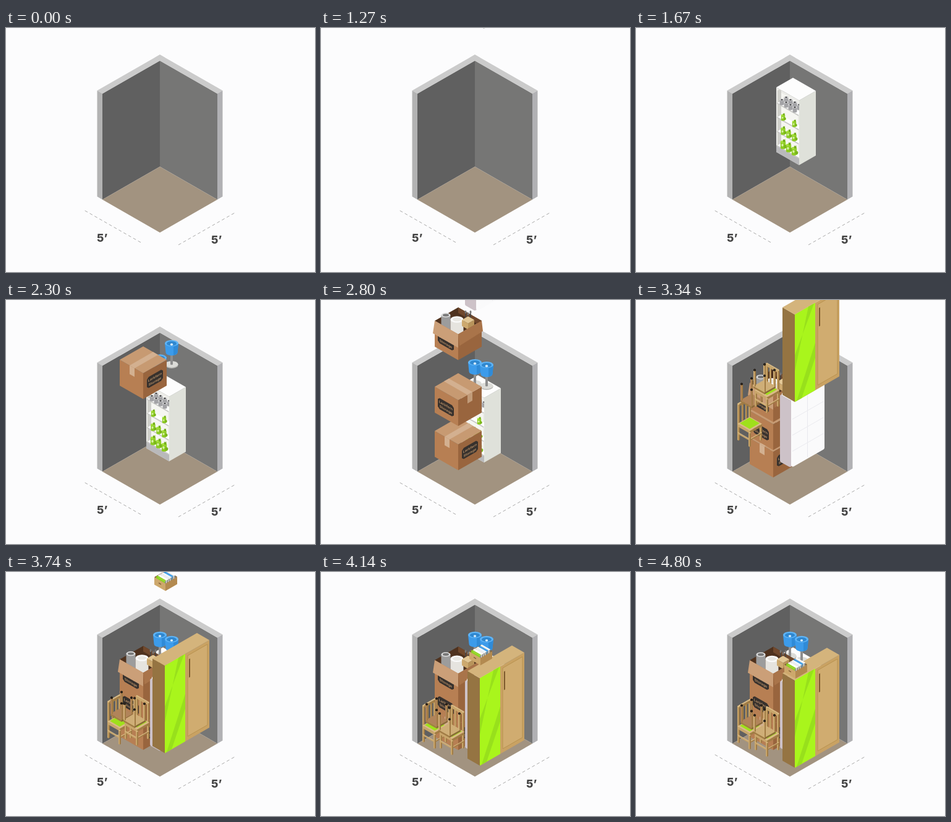
Write an HTML page that moves like this. It is 500x396 px and loops after 4.84 s.

```html
<!DOCTYPE html>
<html lang="en">
<head>
<meta charset="utf-8">
<title>Filling a storage unit</title>
<style>
html, body { margin: 0; width: 100%; height: 100%; overflow: hidden; background: #fcfcfd; }
svg { display: block; width: 100vw; height: 100vh; }
.size { font: 800 18px Inter, "Open Sans", sans-serif; fill: #444; }
.brand { font: 700 5.4px Inter, "Open Sans", sans-serif; fill: #b08a64; text-anchor: middle; }
</style>
</head>
<body>
<svg id="stage" viewBox="0 0 500 396" xmlns="http://www.w3.org/2000/svg"></svg>
<script>
const LOOP = 4840;
const DECAY = 4.62;    // how fast a fall settles, per second
const SLOPE = .575;    // rise of the two floor axes
const stage = document.getElementById('stage');
const range = n => [...Array(n).keys()];

// Isometric space: l runs up to the left, r up to the right, z straight up
const at = (l, r, z) => [r - l, -(l + r) * SLOPE - z];
const poly = (points, fill, extra = '') =>
  `<polygon points="${points.map(p => at(...p).map(v => v.toFixed(1))).join(' ')}" fill="${fill}" ${extra}/>`;
const leftFace = (l0, l1, z0, z1, fill, r = 0, extra) =>
  poly([[l0, r, z0], [l1, r, z0], [l1, r, z1], [l0, r, z1]], fill, extra);
const rightFace = (r0, r1, z0, z1, fill, l = 0, extra) =>
  poly([[l, r0, z0], [l, r1, z0], [l, r1, z1], [l, r0, z1]], fill, extra);
const topFace = (l0, l1, r0, r1, z, fill, extra) =>
  poly([[l0, r0, z], [l1, r0, z], [l1, r1, z], [l0, r1, z]], fill, extra);
const block = (l, r, z, dl, dr, dz, [left, right, top]) =>
  leftFace(l, l + dl, z, z + dz, left, r) + rightFace(r, r + dr, z, z + dz, right, l) +
  topFace(l, l + dl, r, r + dr, z + dz, top);

const place = (x, y, art) => `<g transform="translate(${x} ${y})">${art}</g>`;
const oval = (x, y, rx, ry, fill) => `<ellipse cx="${x}" cy="${y}" rx="${rx}" ry="${ry}" fill="${fill}"/>`;
const tube = (x, y, r, h, side, top) =>
  `<path d="M${x - r} ${y}v${h}a${r} ${r * .5} 0 0 0 ${2 * r} 0v${-h}z" fill="${side}"/>` + oval(x, y, r, r * .5, top);

function room() {
  const floor = 93, outer = 101.5, high = 172, rim = '#cbcbcb';
  const dashes = side => `<path d="M${30 * side} 20L${121 * side} -32" stroke="#a9a9a9" stroke-dasharray="5 4"/>`;
  return place(249, 332,
    rightFace(0, floor, 0, high, '#606060', floor) +
    leftFace(0, floor, 0, high, '#767675', floor) +
    topFace(0, floor, 0, floor, 0, '#a29380') +
    topFace(floor, outer, 0, outer, high, rim) + topFace(0, outer, floor, outer, high, rim) +
    leftFace(floor, outer, 0, high, '#b3b3b3') + rightFace(floor, outer, 0, high, '#b1b1b4')) +
    place(249, 332, dashes(1)) + place(248, 328, dashes(-1)) +
    '<text class="size" x="147" y="346.5">5’</text><text class="size" x="332" y="350">5’</text>';
}

function bottle(x, y, size) {
  return `<g transform="translate(${x} ${y}) scale(${size})">` +
    tube(0, -11, 3.8, 9, '#8ccb22', '#a6e03c') + tube(1.5, -15, 1.6, 4, '#74ad1c', '#f2f2ee') +
    oval(3.5, -4, 2.2, 2.6, '#79b41c') + oval(-1, -6, 1.5, 2, '#d7f0a4') + '</g>';
}

function shelf() {
  const wide = 37, deep = 27, high = 105, step = 23;
  let s = leftFace(0, wide, 0, high, '#ecece8') + leftFace(2, 35, 12, 101, '#f6f6f2') +
    rightFace(0, 6, 12, 101, '#cfcfca', 35) + leftFace(0, wide, 0, 11, '#b9b9bb');
  range(4).forEach(i => {
    const z = 12 + i * step;
    s += topFace(1, 35, 0, 6, z, '#fff') + leftFace(1, 36, z - 2, z, '#c8c8c5');
    if (i < 3) {
      const count = i < 2 ? 3 : 2;
      range(count).forEach(j => {
        const l = 26 - j * 18 / (count - 1);
        s += bottle(-l, at(l, 0, z)[1] + 1, 1.1 - i * .13);
      });
    } else for (const r of [7, 0]) range(4).forEach(j => {
      const [x, y] = at(28 - j * 7, r, z + 9);
      s += tube(x, y, 3.5, 7, '#a3a3a6', '#d4d4d6') + oval(x, y, 1.7, 1.1, '#333');
    });
  });
  return s + rightFace(0, deep, 0, high, '#dfe1da') + topFace(0, wide, 0, deep, high, '#fdfdfd');
}

function lamp() {
  return tube(0, -6, 10.5, 1.5, '#b9b9b5', '#dcdcd8') + tube(0, -26, 2, 20, '#8e8e8e', '#8e8e8e') +
    '<path d="M-11 -40L-9.5 -25A9.5 5 0 0 0 9.5 -25L11 -40Z" fill="#3c9bea"/>' +
    '<path d="M3 -36L11 -40L9.5 -25Q8 -21.5 3 -20.5Z" fill="#2f8bd8"/>' +
    oval(0, -40, 11, 5.2, '#5fb4f6') + oval(0, -39.5, 8, 3.6, '#2f87cf') + oval(0, -38, 2.2, 1.8, '#d9efff');
}

const CARD = ['#b77f53', '#99653e', '#c79a72'], TAPE = '#d3b090';
const SIDE = 38, TALL = 42;

function label(l, r, z, slope) {
  const [x, y] = at(l, r, z);
  return `<g transform="matrix(1 ${slope} 0 1 ${x} ${y})">` +
    '<path d="M-10 -9H10L13 -6V6L10 9H-10L-13 6V-6Z" fill="#37312d"/>' +
    '<text class="brand" y="-1">Larkfern</text><text class="brand" y="6">Storage</text></g>';
}

function carton(labelRight) {
  return block(0, 0, 0, SIDE, SIDE, TALL, CARD) + (labelRight
    ? topFace(14, 22, 0, SIDE, TALL, TAPE) + leftFace(14, 22, 28, TALL, TAPE) + label(0, 19, 22, -SLOPE)
    : topFace(0, SIDE, 15, 23, TALL, TAPE) + rightFace(15, 23, 28, TALL, '#c19b79') + label(20, 0, 19, SLOPE));
}

function openCarton() {
  const cutlery = range(3).map(i =>
    tube(12 + i * 4, -78 + i % 2 * 3, .8, 16, '#444', '#444') + oval(12 + i * 4, -78 + i % 2 * 3, 1.5, 2.5, '#777'));
  return topFace(0, SIDE, 0, SIDE, TALL, '#4f321e') +
    leftFace(0, SIDE, 33, TALL, '#70482c', SIDE) +
    tube(-20, -73, 7.5, 26, '#9c9c9c', '#dcdcdc') + oval(-20, -73, 5, 2.2, '#777') +
    tube(-2, -66, 10.5, 24, '#e6e4df', '#fafafa') + oval(-2, -66, 7, 3, '#e9e7e2') +
    cutlery.join('') + block(2, 18, 38, 10, 10, 10, ['#cda96f', '#b8945b', '#e2c795']) +
    leftFace(0, SIDE, 0, TALL, CARD[0]) + rightFace(0, SIDE, 0, TALL, CARD[1]) + label(20, 0, 19, SLOPE) +
    poly([[0, 0, TALL], [SIDE, 0, TALL], [SIDE + 3, 0, 20], [0, 0, 20]], '#cb9f78') +
    poly([[0, 0, TALL], [0, SIDE, TALL], [0, SIDE + 2, 24], [0, 2, 22]], '#a9744a');
}

function mattress() {
  const round = color => `stroke="${color}" stroke-width="6" stroke-linejoin="round"`;
  const seams = range(3).map(i => rightFace(2, 53, 28 + i * 26, 29 + i * 26, '#e9e9ee'));
  return leftFace(2, 15, 6, 110, '#cdc2c8', 0, round('#cdc2c8')) +
    rightFace(3, 51, 6, 110, '#fafafb', 0, round('#fafafb')) +
    topFace(3, 15, 3, 51, 112, '#fff', round('#fff')) +
    seams.join('') + rightFace(26, 27, 5, 112, '#e9e9ee');
}

const WOOD = ['#c9a66b', '#a17c45', '#dabb85'];
const BLACK = ['#1c1713', '#1c1713', '#1c1713'];

// The backrest stands on the rear left edge, or the rear right one when mirrored
function chair(mirrored) {
  const bar = (l, r, z, dl, dr, dz) =>
    mirrored ? block(r, l, z, dr, dl, dz, WOOD) : block(l, r, z, dl, dr, dz, WOOD);
  return bar(18, 18, 0, 2, 2, 58) + bar(18, 12, 28, 1, 2, 28) + bar(18, 6, 28, 1, 2, 28) +
    bar(18, 0, 55, 2, 20, 4) + bar(18, 0, 0, 2, 2, 58) + bar(0, 18, 0, 2, 2, 24) +
    bar(0, 0, 10, 1, 20, 2) + bar(0, 0, 10, 20, 1, 2) +
    bar(0, 0, 22, 20, 20, 4) + topFace(2, 18, 2, 18, 27, '#9fe01c') + bar(0, 0, 0, 2, 2, 22);
}

// Upside-down chair, legs in the air
function flipped(seat) {
  const leg = (l, r) => block(l, r, 3, 2, 2, 26, [seat, WOOD[1], seat]) + block(l, r, 28, 2, 2, 2, BLACK);
  return block(0, 0, 0, 18, 18, 3, [WOOD[1], '#8a683a', seat]) +
    leg(16, 16) + leg(16, 0) + leg(0, 16) + leg(0, 0);
}

function wardrobe() {
  const high = 142, streak = '#98e01c';
  return block(0, 0, 0, 20, 72, high, ['#957442', '#c9a263', '#d4b47c']) +
    rightFace(0, 33, 0, high, '#a9f51c') +
    poly([[0, 0, 50], [0, 22, high], [0, 31, high], [0, 0, 76]], streak) +
    poly([[0, 3, 0], [0, 33, 77], [0, 33, 53], [0, 11, 0]], streak) +
    rightFace(37, 69, 6, 137, '#d0ac70', 0, 'stroke="#b8924f"') +
    rightFace(39, 41, 100, 130, '#7c5a2c');
}

function bookBox() {
  const covers = ['#8fd420', '#fff', '#ececec', '#fff', '#3b9be6', '#fff'];
  const books = range(6).reverse().map(i =>
    block(2, 1 + i * 3, 4, 14, 2.2, 10, [covers[i], '#8f8f86', covers[i]]));
  return topFace(0, 18, 0, 19, 12, '#7c5a35') + books.join('') +
    leftFace(0, 18, 0, 12, '#cda86c') + rightFace(0, 19, 0, 12, '#b38a50') + leftFace(7, 11, 6, 7.5, '#7c5a35');
}

// [drawing, resting x, resting y, moment it enters from above], back to front
const items = [
  [shelf(), 264, 264, 1270],
  [lamp(), 249, 142, 1690],
  [lamp(), 268, 149, 2010],
  [carton(true), 222, 289, 2125],
  [carton(false), 222, 247, 2420],
  [openCarton(), 222, 207, 2663],
  [mattress(), 251, 298, 2785],
  [chair(false), 184, 288, 2960],
  [flipped('#b1845a'), 187, 256, 3090],
  [chair(true), 212, 300, 3136],
  [flipped('#cfae77'), 208, 272, 3162],
  [wardrobe(), 257, 318, 3182],
  [bookBox(), 258, 174, 3699]
];

stage.innerHTML = room() + items.map(([art]) => `<g class="item">${art}</g>`).join('');
const nodes = stage.querySelectorAll('.item');

function draw(t) {
  items.forEach(([, x, y, enter], i) => {
    const fallen = t < enter ? 0 : 1 - Math.exp(-DECAY * (t - enter) / 1000);
    nodes[i].setAttribute('visibility', fallen ? 'visible' : 'hidden');
    nodes[i].setAttribute('transform', `translate(${x} ${(y * fallen).toFixed(2)})`);
  });
}

const start = performance.now();
function tick() {
  draw((performance.now() - start) % LOOP);
  requestAnimationFrame(tick);
}
draw(0);
requestAnimationFrame(tick);
</script>
</body>
</html>
```
